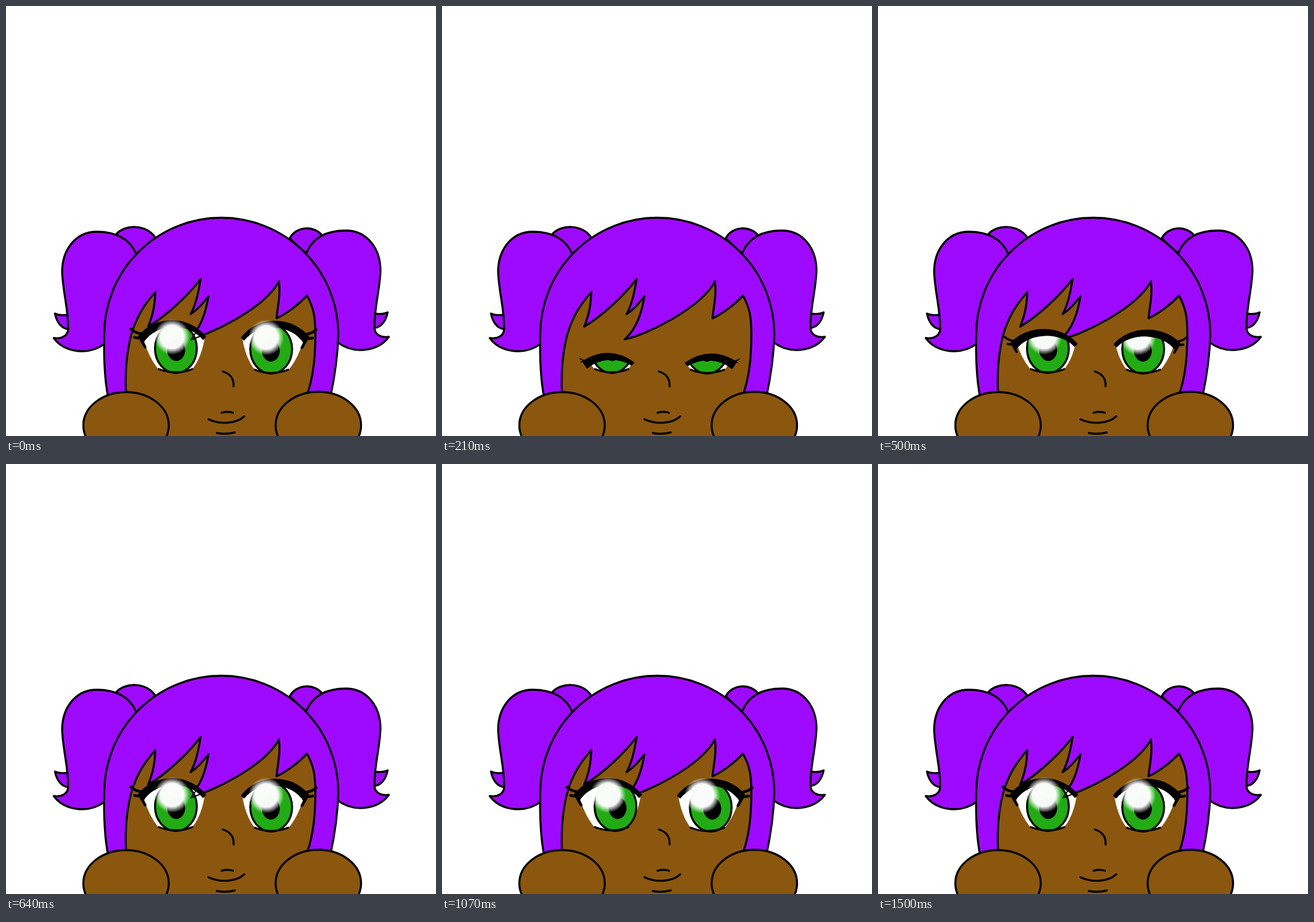
These frames come from a looping animation (720 by 720 pixels, 2.64 s). An HTML page with a canvas:

```html
<!DOCTYPE html>
<html lang="en">
<head>
<meta charset="utf-8">
<title>Peeking girl</title>
<style>
  html, body { margin: 0; width: 100%; height: 100%; overflow: hidden; background: #fff; }
  canvas { display: block; width: 720px; height: 720px; }
</style>
</head>
<body>
<canvas id="stage" width="720" height="720"></canvas>
<script>
const ctx = document.getElementById('stage').getContext('2d');
const HAIR = '#9e0aff', SKIN = '#8b570e', GREEN = '#22ab14', INK = '#000';
const LOOP = 2640, STEPS_PER_MS = 14 / 1000;
const LINE = 3.4;

function shape(path, fill, width = LINE) {
  const p = new Path2D(path);
  if (fill) { ctx.fillStyle = fill; ctx.fill(p); }
  if (width) { ctx.lineWidth = width; ctx.stroke(p); }
}

function oval(x, y, rx, ry, fill, width = LINE) {
  const p = new Path2D();
  p.ellipse(x, y, rx, ry, 0, 0, 7);
  shape(p, fill, width);
}

// Draws flipped left to right, so that x becomes sum - x.
function mirrored(sum, dy, paint) {
  ctx.save();
  ctx.translate(sum, dy);
  ctx.scale(-1, 1);
  paint();
  ctx.restore();
}

function drawPigtail() {
  shape('M104 517C97 518 88 518 82 515C85 530 93 540 104 541', HAIR);
  shape('M218 415C208 392 188 378 152 378C115 378 94 410 94 445C95 478 105 510 104 541C104 552 93 558 80 556C92 573 112 578 128 578C145 578 157 572 166 565', HAIR);
}

function drawHead() {
  shape('M184 383C198 365 236 365 250 388L218 416Z', HAIR);
  shape('M475 389C486 368 517 367 530 385L503 415Z', HAIR);
  drawPigtail();
  mirrored(721, -2, drawPigtail);
  shape('M171 655Q163 615 164.5 550A196 195.5 0 0 1 556.5 550Q555 600 543 655', HAIR);

  const fringe = 'M201 650C198 600 206 560 213 540C222 515 232 500 250 479C249 500 247 515 238 537C268 519 304 486 326 457C322 480 318 500 309 516C322 508 330 497 339 486C334 515 326 540 306 558C340 552 434 506 457 461C460 485 455 500 453 523C470 515 490 500 504 485C515 505 518 520 518 550C518 590 513 625 505 648';
  shape(fringe + 'V720H201Z', SKIN, 0);
  shape(fringe);

  shape('M363 612C376 616 382 624 381 637');
  shape('M361 681Q371 678 380 681M339 692C358 701 385 700 399 687M353 715Q368 718 383 714');
  oval(201, 702, 71.5, 55.5, SKIN);
  oval(523, 702, 71.5, 56, SKIN);
}

function drawShine(x, y = 554, r = 30) {
  const glow = ctx.createRadialGradient(x, y, 0, x, y, r);
  glow.addColorStop(.65, '#fffffff8');
  glow.addColorStop(1, '#fff0');
  ctx.fillStyle = glow;
  ctx.fillRect(x - r, y - r, 2 * r, 2 * r);
}

// lid: 0 open, 1 half shut; gaze: -1 outwards, 1 towards the nose
function drawEye(lid, gaze, shineX) {
  const ox = 222 + 14 * lid ** 2, oy = 553 + 42 * lid;
  const ix = 334 - 13 * lid ** 2, iy = 554 + 43 * lid;
  const top = 527 + 55 * lid;
  const cy = (top - (oy + iy) / 8) / .75;
  const c1 = ox + 28, c2 = ix - 28;
  const lidLine = `M${ox} ${oy}C${c1} ${cy} ${c2} ${cy} ${ix} ${iy}`;

  ctx.save();
  ctx.clip(new Path2D(`${lidLine}V640H${ox}Z`));
  shape('M229 553Q238 588 256 609Q285 619 312 608Q328 588 333 553Q285 505 229 553Z', '#fff', 0);
  oval(284.5 + 12 * gaze, 573.5, 35, 41, GREEN);
  oval(285 + 18 * gaze, 576, 15, 18.5, INK, 0);
  if (lid) drawShine(shineX);
  ctx.restore();

  shape('M256 608Q285 619 312 608');
  shape(`${lidLine}l-4 4C${c2} ${cy + 10} ${c1} ${cy + 11} ${ox + 7} ${oy + 11}Z`, INK, 2);

  ctx.save();
  ctx.translate(ox, oy);
  const size = 1 - .6 * Math.min(lid, 1);
  ctx.scale(size, size);
  shape('M-13 -12Q-4 -4 12 -3M-7 2Q2 4 12 2M2 2Q6 10 11 18', null, 4.5);
  ctx.restore();
  if (!lid) drawShine(shineX);
}

// A sideways glance: half way, held for two steps, half way back.
const glance = offset => Math.max(0, 1.25 - Math.abs(offset) / 2);

function draw(ms) {
  const step = Math.floor((ms % LOOP + 5) * STEPS_PER_MS);
  const lid = 1.41 * Math.max(0, 1 - Math.abs(step - 4) / 4) ** 1.2;
  const gaze = glance(step - 13.5) - glance(step - 18.5);

  ctx.fillStyle = '#fff';
  ctx.fillRect(0, 0, 720, 720);
  ctx.strokeStyle = INK;
  ctx.lineCap = ctx.lineJoin = 'round';
  drawHead();
  drawEye(lid, gaze, 278);
  mirrored(728.5, 1, () => drawEye(lid, -gaze, 293));
  if (!lid && gaze <= 0) shape('M310 559L330 551M310 558L321 543', null, 2);
}

const start = performance.now();
function tick() {
  draw(performance.now() - start);
  requestAnimationFrame(tick);
}
tick();
</script>
</body>
</html>
```
